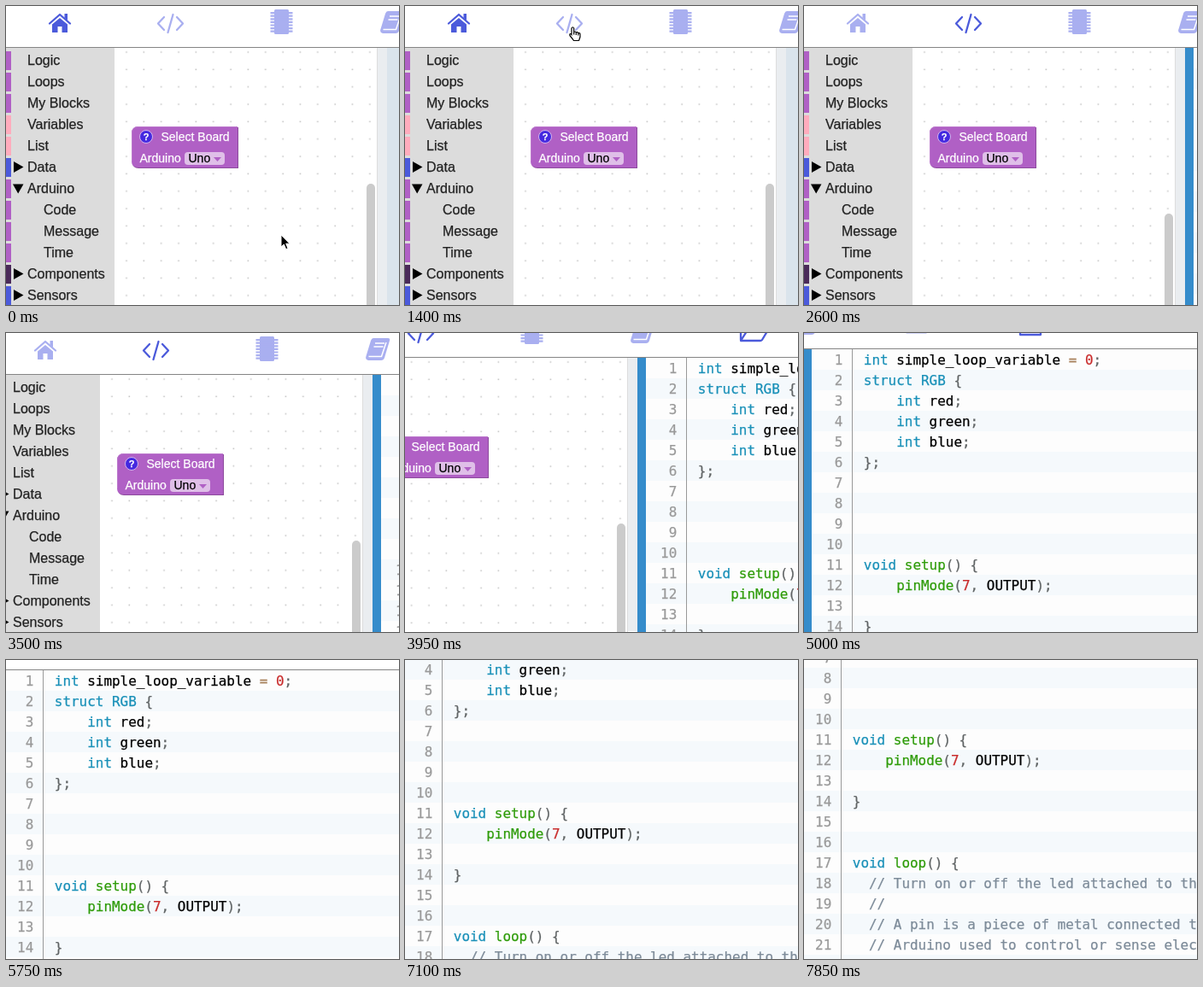
An HTML page for the animation above (8000 ms loop, 460x350 px).

```html
<!DOCTYPE html>
<html lang="en">
<head>
<meta charset="utf-8">
<title>Block and code editor</title>
<style>
html, body { margin: 0; width: 100%; height: 100%; overflow: hidden; background: #fff; }
svg { display: block; width: 460px; height: 350px; }
text { font-family: "Liberation Sans", Arial, sans-serif; font-size: 16px; color: #222; white-space: pre; }
text, tspan { fill: currentColor; stroke: currentColor; stroke-width: .25px; }
.block text { font-size: 14px; color: #fff; }
#code text { font-family: "DejaVu Sans Mono", monospace; font-size: 15.95px; color: #000; }
#code .num { color: #999; text-anchor: end; }
.keyword { color: #1990b8; }
.func { color: #2f9c0a; }
.number { color: #c92c2c; }
.operator { color: #a67f59; }
.comment { color: #7d8b99; }
.punct { color: #5f6364; }
.icon { color: #a9aff0; fill: currentColor; }
.icon.on { color: #4b5adb; }
.icon .line { fill: none; stroke: currentColor; stroke-width: 2.3; stroke-linejoin: round; stroke-linecap: round; }
</style>
</head>
<body>
<svg viewBox="0 0 460 350">
  <defs>
    <pattern id="dots" x="131" y="44" width="20.35" height="20.35" patternUnits="userSpaceOnUse">
      <rect x="9.2" y="9.2" width="1.6" height="1.6" fill="#c4c4c4"/>
    </pattern>
    <pattern id="stripes" y="49" width="48" height="48" patternUnits="userSpaceOnUse">
      <rect width="48" height="48" fill="#fdfdfd"/>
      <rect y="24" width="48" height="24" fill="#f5f9fc"/>
    </pattern>
  </defs>
  <g id="world">
    <rect x="127" y="49" width="307" height="320" fill="#fff"/>
    <rect x="127" y="49" width="307" height="320" fill="url(#dots)"/>
    <rect y="49" width="127" height="320" fill="#dcdcdc"/>
    <g id="menu"></g>
    <rect id="thumb" x="422" width="10" height="400" rx="5" fill="#cbcbcb"/>
    <rect x="434" y="49" width="12" height="320" fill="#eaedf0"/>
    <path d="M434.5 49V370" stroke="#ddd"/>

    <g class="block">
      <path d="M155 142H272V190H155Q148 190 148 183V150Q148 142 155 142Z" fill="#8d4b9d"/>
      <path d="M155 141H271V189H155Q147 189 147 182V149Q147 141 155 141Z" fill="#b060c5"/>
      <path d="M147.5 182V149Q147.5 141.5 155 141.5H271" fill="none" stroke="#bb78cc"/>
      <circle cx="164" cy="153" r="7.5" fill="#4429e0" stroke="#d3b4ee"/>
      <text x="164" y="157" text-anchor="middle" style="font-size:11px;font-weight:bold">?</text>
      <text x="181.5" y="158">Select Board</text>
      <text x="156.5" y="183">Arduino</text>
      <rect x="209" y="171" width="47" height="15" rx="4" fill="#dfbfe8"/>
      <text x="213.5" y="183" style="color:#000">Uno</text>
      <path d="M243 177H252L247.500 182Z" fill="#b060c5"/>
    </g>

    <rect id="blank" x="446" y="49" width="500" height="320" fill="#dae4ec"/>
    <g id="code">
      <rect x="446" y="49" width="500" height="700" fill="url(#stripes)"/>
      <rect x="446" y="49" width="10" height="700" fill="#358ccb"/>
      <path d="M503.5 49V749" stroke="#999"/>
    </g>

    <rect y="-10" width="960" height="58" fill="#fff"/>
    <path d="M0 48.500H960" stroke="#858585"/>
    <g class="icon" id="home">
      <path class="line" d="M51 20.500L63 10L75 20.500"/>
      <path d="M54 21.500L63 14L72 21.500V31H65.500V24H60.500V31H54ZM68.500 9H72V17L68.500 14Z"/>
    </g>
    <g class="icon" id="source">
      <path class="line" d="M185 13L178 20.500L185 28M200 13L207 20.500L200 28M195.500 10L189.500 31"/>
    </g>
    <g class="icon">
      <rect x="314" y="4" width="17" height="29" rx="1.500"/>
      <path d="M322.500 7V31" stroke="currentColor" stroke-width="26" stroke-dasharray="2.2 1.4"/>
    </g>
    <g class="icon">
      <path d="M447 6H464Q467 6 466 9L460 29Q459 32 456 32H441Q437 31 438.500 27L444 9Q445 6 447 6Z"/>
      <path d="M449 12H460M447.500 16H458.500M441.500 27.500H456.500L462 11" fill="none" stroke="#fff" stroke-width="1.500"/>
    </g>
    <g class="icon on">
      <path class="line" d="M567 28V10Q567 8 569 8H576L579 11H590Q592 11 592 13V17M567 29L574 18H598L592 28Q591 29 590 29Z"/>
    </g>
    <g class="icon on">
      <path class="line" d="M700 5H717L724 12V32H700ZM717 5V12H724"/>
    </g>
    <g class="icon">
      <path d="M838 5H845V14H851L841.500 23L832 14H838ZM829 21H834L841.500 27L849 21H854Q856 21 856 23V28Q856 30 854 30H829Q827 30 827 28V23Q827 21 829 21Z"/>
      <path d="M847 27H849M851 27H853" stroke="#fff" stroke-width="1.500"/>
    </g>
  </g>
  <g id="cursor" stroke-linejoin="round">
    <path id="arrow" d="M0 0V14L3.300 11L5.700 16.700L8 15.700L5.700 10.200H10Z" fill="#000" stroke="#fff"/>
    <path id="hand" d="M3 9V2Q4.300 -.5 5.700 2V6.500Q7.500 5.300 8.300 7Q10 6 10.800 7.700Q13 7 13 9.500V12Q12.500 14 11.500 16.500H5.500Q4 14 1.200 11Q.2 9 1.500 8.500Q2.500 8.500 3.500 10.500M5.700 6.500V9.500M8.300 7V10M10.800 7.700V10.500" fill="#fff" stroke="#000" stroke-width="1.200"/>
  </g>
</svg>
<script>
const $ = id => document.getElementById(id);

function add(parent, tag, attrs, text = "") {
  const el = document.createElementNS("http://www.w3.org/2000/svg", tag);
  for (const k in attrs) el.setAttribute(k, attrs[k]);
  el.textContent = text;
  parent.append(el);
  return el;
}

// Sidebar: label, bar colour, and "+" closed, "-" open or ">" nested
const purple = "#b060c5", pink = "#ffacbd", blue = "#4b5adb";
[["Logic", purple], ["Loops", purple], ["My Blocks", purple], ["Variables", pink],
 ["List", pink], ["Data", blue, "+"], ["Arduino", purple, "-"], ["Code", purple, ">"],
 ["Message", purple, ">"], ["Time", purple, ">"], ["Components", "#4a2a59", "+"],
 ["Sensors", blue, "+"]
].forEach(([label, fill, kind], i) => {
  const y = 63.5 + 25 * i, menu = $("menu");
  add(menu, "rect", { x: 0, y: y - 10.5, width: 6, height: 22, fill });
  add(menu, "text", { x: kind === ">" ? 44 : 25, y: y + 5.5 }, label);
  if (kind === "+") add(menu, "path", { d: `M9 ${y - 6.5}L20.5 ${y}L9 ${y + 6.5}Z` });
  if (kind === "-") add(menu, "path", { d: `M8 ${y - 5}H20.500L14.200 ${y + 6}Z` });
});

const program = `int simple_loop_variable = 0;
struct RGB {
    int red;
    int green;
    int blue;
};




void setup() {
    pinMode(7, OUTPUT);

}


void loop() {
  // Turn on or off the led attached to the pin
  //
  // A pin is a piece of metal connected to the
  // Arduino used to control or sense electricity`;

const rules = [
  ["comment", /^\/\/.*/], ["keyword", /^(int|struct|void|RGB)\b/], ["func", /^\w+(?=\()/],
  ["number", /^\d+/], ["operator", /^=/], ["punct", /^[(){};,]/], ["", /^(\w+|\s+)/]
];

program.split("\n").forEach((line, i) => {
  const y = 67 + 24 * i;
  add($("code"), "text", { x: 492.3, y, class: "num" }, i + 1);
  const row = add($("code"), "text", { x: 516.8, y });
  while (line) {
    const [name, re] = rules.find(r => r[1].test(line));
    const word = line.match(re)[0];
    add(row, "tspan", { class: name }, word);
    line = line.slice(word.length);
  }
});

// Held poses: time, x, y
const camera = [
  [0, 0, 0], [3500, -17, 0], [3650, -57, -6], [3800, -112, -14], [3950, -174, -20],
  [4100, -243, -20], [4250, -311, -19], [4400, -374, -18], [4550, -425, -18],
  [4850, -437, -24], [5000, -447, -30], [5150, -453, -33], [5300, -457, -35],
  [5750, -460, -37]
];
// Three short scrolls of two equal steps each
[6500, 6650, 7100, 7250, 7700, 7850].forEach((t, i) =>
  camera.push([t, -460, Math.round(-37 - 28.5 * (i + 1))]));

const pointer = [
  [0, 322, 268], [500, 290, 200], [650, 235, 80], [800, 201, 12], [1100, 198, 16],
  [1250, 194, 21], [1400, 192, 24], [1550, 191, 25], [1700, 192, 25],
  [2450, 205, 6], [2600, -50, -50]
];

const pose = (keys, t) => keys.findLast(k => k[0] <= t);
const move = (el, [, x, y]) => el.setAttribute("transform", `translate(${x} ${y})`);
const show = (el, on) => el.style.display = on ? "" : "none";

function frame() {
  const t = performance.now() % 8000, open = t >= 2000;
  move($("world"), pose(camera, t));
  move($("cursor"), pose(pointer, t));
  show($("arrow"), t < 800);
  show($("hand"), t >= 800);
  show($("code"), open);
  show($("blank"), !open);
  $("home").classList.toggle("on", !open);
  $("source").classList.toggle("on", open);
  $("thumb").setAttribute("y", open ? 243 : 208);
  requestAnimationFrame(frame);
}
frame();
</script>
</body>
</html>
```
